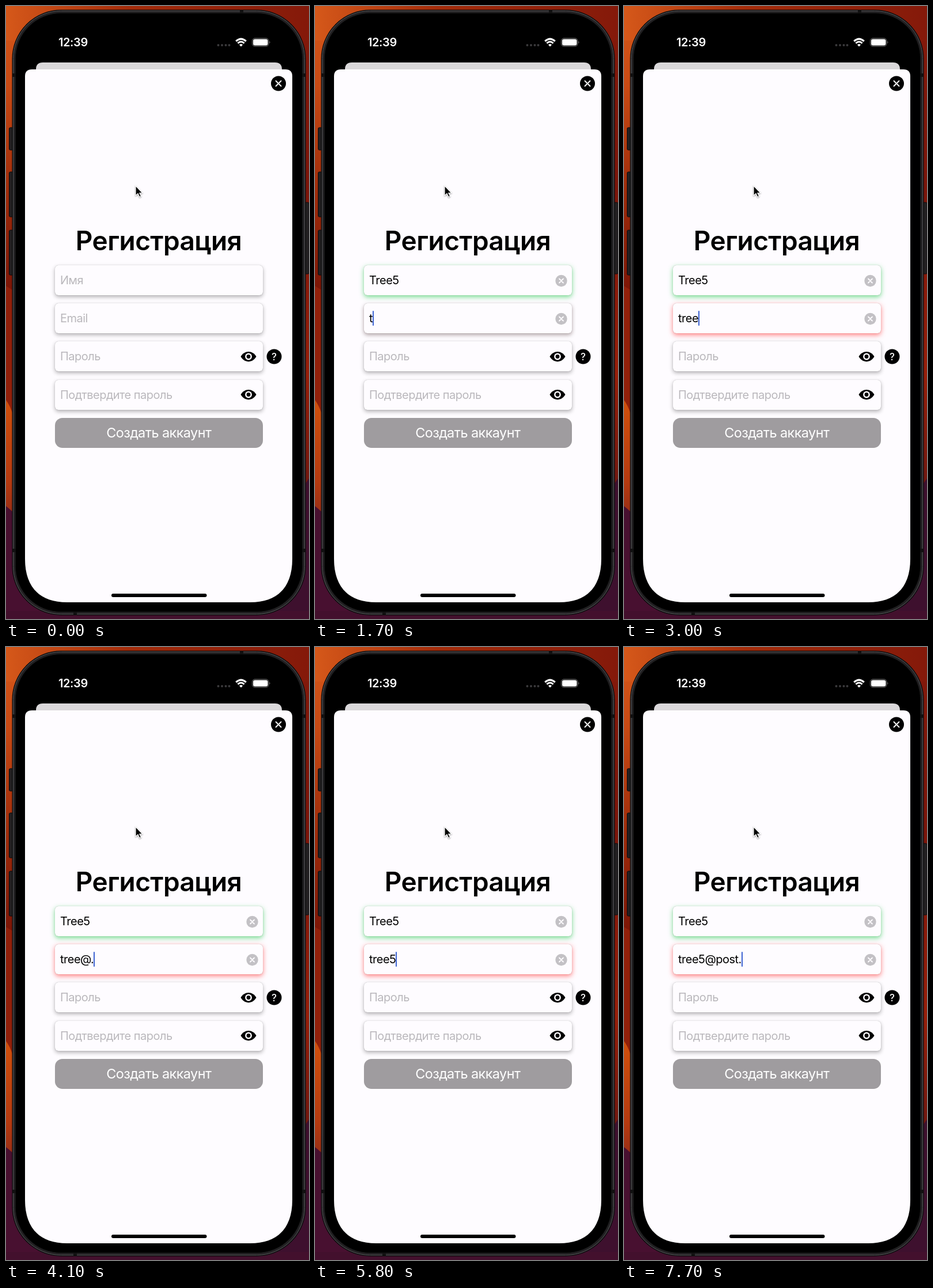
An HTML page that plays this animation: 526 px wide and 1064 px high, repeating every 8 s.

```html
<!DOCTYPE html>
<html lang="ru">
<head>
<meta charset="utf-8">
<style>
  html, body { margin: 0; width: 100%; height: 100%; overflow: hidden; background: #000; }
  #stage { position: relative; width: 526px; height: 1064px; overflow: hidden; font: 20px Inter, sans-serif; }
  svg { position: absolute; left: 0; top: 0; }
  #stage > div { position: absolute; white-space: pre; }
  .time { left: 91px; top: 51px; line-height: 24px; color: #fff; font-weight: 600; letter-spacing: -.4px; }
  .title { left: 33px; width: 464px; top: 379px; line-height: 56px; text-align: center; font-size: 46px; font-weight: 600; letter-spacing: -.6px; }
  .field { left: 85px; width: 351.5px; height: 52px; padding-left: 9px; box-sizing: content-box; line-height: 53px;
    border-radius: 6px; background: #fefcff; letter-spacing: -.5px; color: #000; }
  .field .hint { color: #bab8bc; }
  .caret { position: absolute; top: 13px; width: 2.6px; height: 26px; border-radius: 1px; background: #3d63d2; }
  .button { left: 85px; top: 715px; width: 360.5px; height: 52px; border-radius: 13px; background: #9f9c9f;
    color: #fff; font-size: 23.5px; line-height: 52px; text-align: center; letter-spacing: -.6px; }
</style>
</head>
<body>
<div id="stage">
  <svg width="526" height="1064">
    <defs>
      <linearGradient id="left" x2="0" y2="1">
        <stop offset="0" stop-color="#d5581a"/><stop offset=".13" stop-color="#c84a14"/>
        <stop offset=".3" stop-color="#a02c0a"/><stop offset=".46" stop-color="#7d1606"/>
      </linearGradient>
      <linearGradient id="right" x2="0" y2="1">
        <stop offset="0" stop-color="#84190a"/><stop offset=".3" stop-color="#7c150a"/>
        <stop offset=".6" stop-color="#981f0a"/><stop offset=".77" stop-color="#74180f"/>
      </linearGradient>
      <linearGradient id="top">
        <stop offset="0" stop-color="#d5581a"/><stop offset=".4" stop-color="#a42c0a"/><stop offset="1" stop-color="#84190a"/>
      </linearGradient>
      <linearGradient id="glow" x2="0" y2="1">
        <stop offset="0" stop-color="#d0500c"/><stop offset=".45" stop-color="#b53a10"/><stop offset="1" stop-color="#5e1620"/>
      </linearGradient>
      <g id="eye">
        <path d="M-13.5 0C-7-11.5 7-11.5 13.5 0C7 11.5-7 11.5-13.5 0Z"/>
        <circle r="5.9" fill="#fefcff"/><circle r="3.4"/>
      </g>
      <g id="cross"><circle r="10.2" fill="#c3c1c5"/><path d="M-3.5-3.5l7 7m0-7l-7 7" stroke="#fefcff" stroke-width="1.8" stroke-linecap="round"/></g>
    </defs>
    <!-- wallpaper -->
    <rect width="263" height="1064" fill="url(#left)"/>
    <rect x="263" width="263" height="1064" fill="url(#right)"/>
    <rect width="526" height="60" fill="url(#top)"/>
    <path d="M0 486L40 510V1064H0Z" fill="#92200a"/>
    <path d="M0 684Q12 700 20 740V1000H0Z" fill="url(#glow)"/>
    <path d="M0 868Q60 915 120 1064H0Z" fill="#481030"/>
    <path d="M526 820L470 900L380 1064H526Z" fill="#3e102e"/>
    <rect y="1050" width="526" height="14" fill="#43102d"/>
    <!-- phone -->
    <g fill="#232022" stroke="#0c0b0c">
      <rect x="5.5" y="211" width="8" height="39" rx="2"/><rect x="5.5" y="288" width="8" height="78" rx="2"/>
      <rect x="5.5" y="389" width="8" height="78" rx="2"/><rect x="517" y="341" width="9" height="124" rx="2"/>
    </g>
    <rect x="11.5" y="7.5" width="508" height="1049" rx="84" fill="#222123" stroke="#0c0c0d" stroke-width="2"/>
    <rect x="12.5" y="8.5" width="506" height="1047" rx="83" fill="none" stroke="#59585b"/>
    <path d="M12 120h6m495 0h6M12 945h6m495 0h6M409 8v6M120 1050v6" stroke="#111" stroke-width="6"/>
    <rect x="16.5" y="12.5" width="498" height="1039" rx="79" stroke="#111"/>
    <!-- sheets -->
    <path d="M52 120V110Q52 98 64 98H467Q479 98 479 110V120Z" fill="#dad8da"/>
    <path d="M33 122Q33 110 45 110H485Q497 110 497 122V960C497 1008 472 1035 424 1035H106C58 1035 33 1008 33 960Z" fill="#fefcff"/>
    <rect x="183" y="1020" width="165.500" height="6" rx="3"/>
    <!-- status bar -->
    <g fill="#3b3a3c"><circle cx="368.500" cy="68" r="2"/><circle cx="375" cy="68" r="2"/><circle cx="381.500" cy="68" r="2"/><circle cx="387.500" cy="68" r="2"/></g>
    <g fill="none" stroke="#fff" stroke-width="3">
      <path d="M399.200 61.200Q408 53 416.800 61.200M402.400 64.600Q408 59.400 413.600 64.600"/>
      <path d="M405 67.200Q408 64.800 411 67.200L408 70.500Z" fill="#fff" stroke="none"/>
    </g>
    <rect x="427.500" y="56" width="28.500" height="14" rx="4.500" fill="none" stroke="#777"/>
    <rect x="429" y="57.500" width="25.500" height="11" rx="3" fill="#fff"/>
    <path d="M457.500 61q2 2 0 4Z" fill="#777"/>
    <!-- round buttons -->
    <circle cx="473" cy="134.500" r="13"/>
    <path d="M468.500 130l9 9m0-9l-9 9" stroke="#fff" stroke-width="1.900" stroke-linecap="round"/>
    <circle cx="465.500" cy="608.500" r="13"/>
    <text x="465.500" y="614.500" fill="#fff" font-size="17" font-weight="500" text-anchor="middle">?</text>
  </svg>
  <div class="time">12:39</div>
  <div class="title">Регистрация</div>
  <div class="button">Создать аккаунт</div>
  <svg id="icons" width="526" height="1064" style="z-index:1">
    <use href="#eye" x="421" y="608.500"/><use href="#eye" x="421" y="674.500"/>
    <use href="#cross" x="427.500" y="477"/><use href="#cross" x="427.500" y="543"/>
    <path d="M225 312V329L229 325.500L231.800 331.600L234.600 330.400L231.900 324.500H237Z"
      stroke="#fff" stroke-width="1.200" style="filter:drop-shadow(0 1px 1px #0006)"/>
  </svg>
</div>
<script>
const LOOP = 8000, FADE = 400;
const GRAY = [0, 0, 0, .3], GREEN = [60, 205, 95, .7], RED = [255, 75, 75, .7];

// Each key stroke: [time, field contents]
const inputs = [
  { hint: 'Имя', tint: GREEN, focus: [100, 900],
    keys: [[200, 'T'], [300, 'Tr'], [400, 'Tre'], [500, 'Tree'], [700, 'Tree5']] },
  { hint: 'Email', tint: RED, focus: [900, LOOP],
    keys: [[1600, 't'], [1900, 'tr'], [2300, 'tre'], [2800, 'tree'], [3700, 'tree@'], [4000, 'tree@.'],
      [4500, 'tree@.r'], [5200, 'tree@.'], [5350, 'tree@'], [5500, 'tree'], [5700, 'tree5'], [5900, 'tree5@'],
      [6300, 'tree5@p'], [6600, 'tree5@po'], [7100, 'tree5@pos'], [7200, 'tree5@post'], [7500, 'tree5@post.']] },
  { hint: 'Пароль', tint: GRAY, focus: [0, 0], keys: [] },
  { hint: 'Подтвердите пароль', tint: GRAY, focus: [0, 0], keys: [] }
];

const stage = document.getElementById('stage');
const crosses = document.querySelectorAll('#icons [href="#cross"]');

inputs.forEach((input, i) => {
  input.box = document.createElement('div');
  input.box.className = 'field';
  input.box.style.top = 450 + i * 66.2 + 'px';
  input.label = document.createElement('span');
  input.caret = document.createElement('i');
  input.caret.className = 'caret';
  input.box.append(input.label, input.caret);
  stage.append(input.box);
});

function mix(a, b, k) {
  return a.map((v, i) => v + (b[i] - v) * k);
}

function draw(now) {
  const time = now % LOOP;
  inputs.forEach(({ hint, tint, focus, keys, box, label, caret }, i) => {
    const text = keys.filter(([at]) => at <= time).pop()?.[1] ?? '';
    label.textContent = text || hint;
    label.className = text ? '' : 'hint';
    caret.style.display = time >= focus[0] && time < focus[1] ? '' : 'none';
    caret.style.left = 8.5 + (text ? label.offsetWidth : 0) + 'px';

    const p = text ? Math.min(1, (time - keys[0][0]) / FADE) : 0;
    const k = p * p * (3 - 2 * p);
    const glow = `rgba(${mix(GRAY, tint, k)})`;
    box.style.boxShadow = `0 0 1px #0005, 0 3px ${7 + 2 * k}px ${glow}`;
    if (crosses[i]) crosses[i].style.display = text ? '' : 'none';
  });
}

const start = performance.now();
function tick() {
  draw(performance.now() - start);
  requestAnimationFrame(tick);
}
tick();
</script>
</body>
</html>
```
